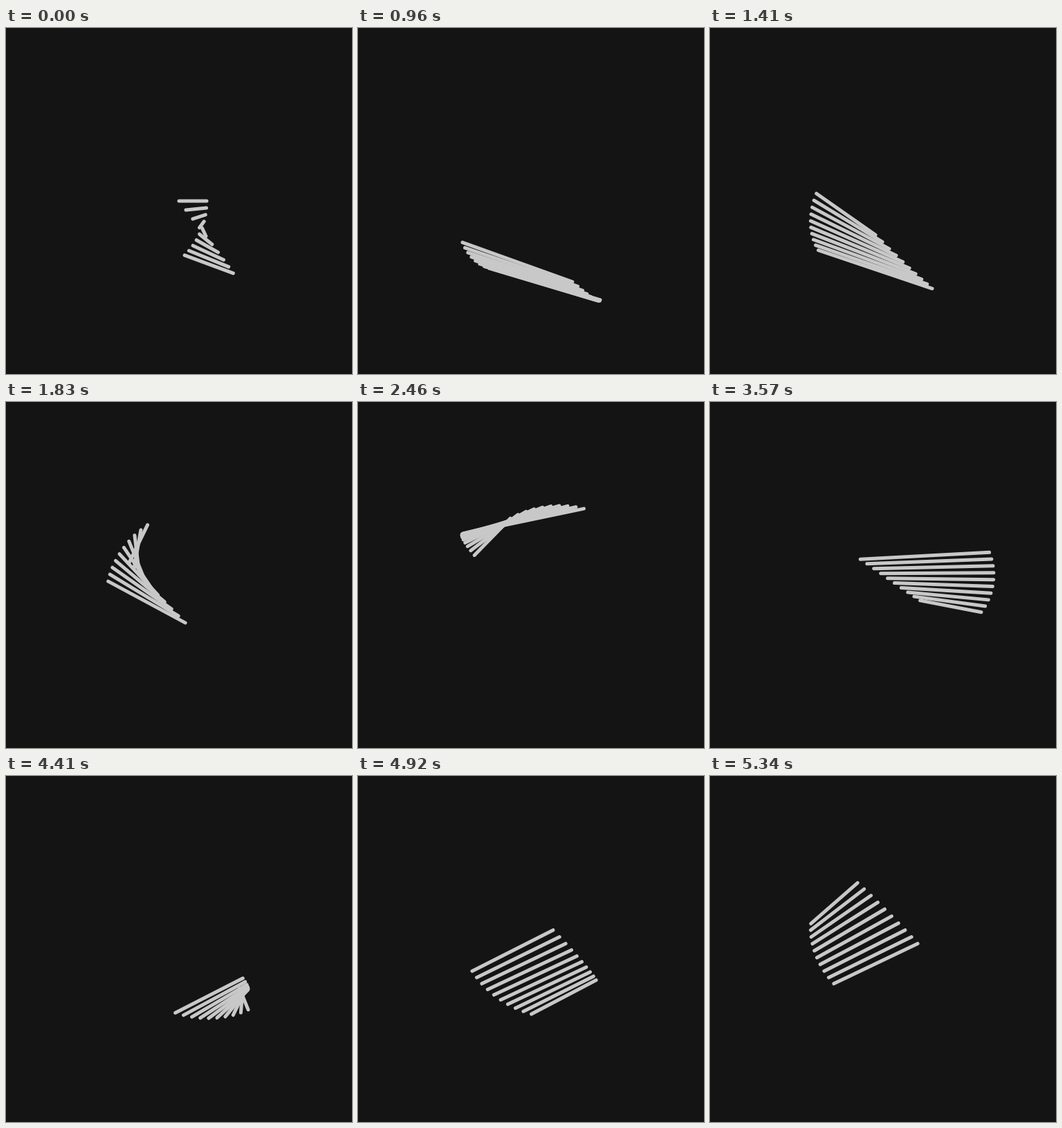
An HTML page with a canvas for the animation above (5.37 s loop, 500 by 500 pixels).

```html
<!DOCTYPE html>
<html>
<head>
<meta charset="utf-8">
<title>Parametric lines</title>
<style>
  html, body { margin: 0; height: 100%; overflow: hidden; background: #141414; }
  canvas { display: block; }
</style>
</head>
<body>
<canvas id="stage" width="500" height="500"></canvas>
<script>
const ctx = document.getElementById('stage').getContext('2d');
const { sin, cos, floor } = Math;
const LINES = 10, STEP = 30, LOOP = 5370;

// Both ends of a line follow sums of two slow waves.
const start = t => [100 * sin(t / 10), 100 * sin(t / 10) + 60 * sin(t / 20)];
const end = t => [100 * cos(t / 10) - 60 * cos(t / 20), 100 * sin(t / 10)];

function draw(ms) {
  const t0 = floor(ms % LOOP / STEP) / 2;
  ctx.setTransform(1, 0, 0, 1, 0, 0);
  ctx.fillStyle = '#141414';
  ctx.fillRect(0, 0, 500, 500);
  ctx.translate(250, 250);
  ctx.strokeStyle = '#c8c8c8';
  ctx.lineWidth = 5;
  ctx.lineCap = 'round';
  for (let i = 0; i < LINES; i++) {
    ctx.beginPath();
    ctx.moveTo(...start(t0 + i));
    ctx.lineTo(...end(t0 + i));
    ctx.stroke();
  }
}

const begin = performance.now();
function tick() {
  draw(performance.now() - begin);
  requestAnimationFrame(tick);
}
tick();
</script>
</body>
</html>
```
